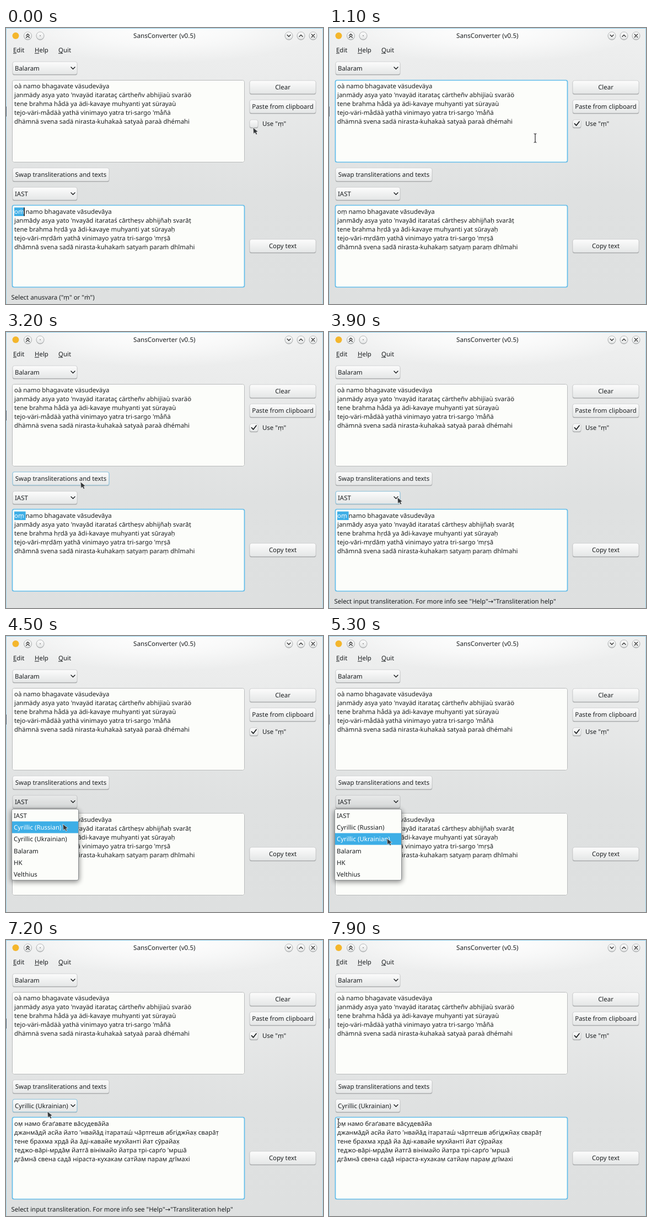
An HTML page that plays this animation: 575 px wide and 499 px high, repeating every 8000 ms.

```html
<!DOCTYPE html>
<html lang="en">
<head>
<meta charset="utf-8">
<title>SansConverter</title>
<style>
  html, body { margin: 0; width: 100%; height: 100%; overflow: hidden; background: #dfe1e1; }
  svg { display: block; width: 575px; height: 499px; }
  text {
    font: 11.43px "Noto Sans", "DejaVu Sans", sans-serif;
    fill: #1c1f21;
    text-rendering: geometricPrecision;
    white-space: pre;
  }
</style>
</head>
<body>
<svg id="stage" viewBox="0 0 575 499" xmlns="http://www.w3.org/2000/svg">
  <defs>
    <linearGradient id="window" x2="0" y2="1">
      <stop offset="0" stop-color="#eff0f0"/>
      <stop offset=".16" stop-color="#ebecec"/>
      <stop offset=".6" stop-color="#dfe1e1"/>
      <stop offset="1" stop-color="#dee0e0"/>
    </linearGradient>
    <radialGradient id="shine" gradientUnits="userSpaceOnUse" cx="0" cy="0" r="1"
      gradientTransform="translate(287 0) scale(280 64)">
      <stop offset="0" stop-color="#fff"/>
      <stop offset=".5" stop-color="#fff" stop-opacity=".6"/>
      <stop offset="1" stop-color="#fff" stop-opacity="0"/>
    </radialGradient>
    <linearGradient id="face" x2="0" y2="1">
      <stop offset="0" stop-color="#fcfcfc"/>
      <stop offset="1" stop-color="#e4e6e6"/>
    </linearGradient>
    <filter id="blur" x="-20%" y="-20%" width="140%" height="140%">
      <feGaussianBlur stdDeviation="5"/>
    </filter>
  </defs>
</svg>
<script>
const LOOP = 8000, STEP = 100;
const BLUE = '#3daee6', INK = '#1c1f21';
const stage = document.getElementById('stage');

function add(tag, attrs, parent = stage) {
  const el = document.createElementNS('http://www.w3.org/2000/svg', tag);
  for (const key in attrs) el.setAttribute(key, attrs[key]);
  parent.append(el);
  return el;
}
const group = (parent) => add('g', {}, parent);
const show = (el, on) => el.setAttribute('visibility', on ? 'visible' : 'hidden');

function rect(x, y, width, height, fill, attrs, parent) {
  return add('rect', { x, y, width, height, fill, ...attrs }, parent);
}
function label(x, y, str, attrs, parent) {
  const el = add('text', { x, y, ...attrs }, parent);
  el.textContent = str;
  return el;
}
function line(d, width = 1.5, stroke = INK, parent) {
  return add('path', { d, fill: 'none', stroke, 'stroke-width': width,
    'stroke-linecap': 'round', 'stroke-linejoin': 'round' }, parent);
}

// Raised panel; returns the hover outline
function raised(x, y, w, h) {
  rect(x - .5, y + .5, w + 1, h + 1, '#858889', { rx: 4, opacity: .3 });
  rect(x, y + 1, w, h, '#979a9b', { rx: 3.5 });
  rect(x, y, w, h, 'url(#face)', { rx: 3.5, stroke: '#c3c5c6', 'stroke-width': .7 });
  return rect(x, y, w, h, 'none', { rx: 3.5, stroke: '#93cbe6', 'stroke-width': 1.1 });
}
function button(x, y, w, h, str) {
  const glow = raised(x, y, w, h);
  label(x + w / 2, y + h / 2 + 4, str, { 'text-anchor': 'middle' });
  return { box: [x, y, w, h], glow };
}
function combo(y) {
  const glow = raised(12, y, 117, 23);
  const pressed = rect(12, y, 117, 23, '#70777b', { rx: 3.5, opacity: .14 });
  show(pressed, false);
  line(`M118 ${y + 9.7}l3.5 3.6l3.5 -3.6`, 1.4);
  return { box: [12, y, 118, 24], glow, pressed, text: label(16, y + 15.5, '') };
}
function field(y) {
  rect(11, y, 422, 149, '#fcfdfa', { rx: 3 });
  rect(11.5, y + .5, 421, 148, 'none', { rx: 3, stroke: '#b9bbbc' });
  const glow = rect(11.5, y + .5, 421, 148, 'none', { rx: 3, stroke: '#62bdea', 'stroke-width': 1.7 });
  return { box: [11, y, 422, 149], glow };
}
function lines(y, rows) {
  const g = group();
  rows.forEach((row, i) => label(15, y + i * 15.9, row, {}, g));
  return g;
}

// Window frame and title bar
rect(0, 0, 575, 499, 'url(#window)');
rect(0, 0, 575, 66, 'url(#shine)');
rect(0, 0, 575, 1, '#8ccbe8');
rect(0, 0, 1, 499, '#a4d6ec');
rect(574, 0, 1, 499, '#a4d6ec');
rect(0, 142, 1, 18, '#49667c');
add('circle', { cx: 17.5, cy: 14, r: 6, fill: '#f4b62c' });
const marks = [
  [39.5, 'M-2.8 -.5l2.8 -2.8l2.8 2.8M-2.8 3.3l2.8 -2.8l2.8 2.8'], [62, 'M0 0h.1'],
  [513, 'M-3 -1.5l3 3l3 -3'], [535, 'M-3 1.5l3 -3l3 3'], [557, 'M-2.7 -2.7l5.4 5.4M2.7 -2.7l-5.4 5.4'],
];
for (const [x, d] of marks) {
  add('circle', { cx: x, cy: 14.6, r: 7.2, fill: '#999c9d' });
  add('circle', { cx: x, cy: 14, r: 7, fill: 'url(#face)', stroke: '#a9abac', 'stroke-width': .8 });
  line(d, 1.3, '#333').setAttribute('transform', `translate(${x} 14)`);
}
label(287.3, 18, 'SansConverter (v0.5)', { 'text-anchor': 'middle', style: 'font-size:11.65px' });
for (const [x, str, w] of [[13, 'Edit', 6], [52, 'Help', 8], [95, 'Quit', 8]]) {
  label(x, 44, str);
  rect(x, 45.3, w, 1, INK);
}

// Controls
const inCombo = combo(61), outCombo = combo(288);
inCombo.text.textContent = 'Balaram';
const buttons = [
  inCombo, outCombo,
  button(12, 253, 175, 24, 'Swap transliterations and texts'),
  button(442, 95, 120, 24, 'Clear'),
  button(442, 130, 120, 24, 'Paste from clipboard'),
  button(442, 382, 120, 24, 'Copy text'),
];
const check = { box: [441, 163, 72, 20], glow: raised(442, 166, 15, 14) };
show(check.glow, false);
const tick = line('M445.5 173l3 3.2l5.5 -7', 1.8);
label(465, 177, 'Use "ṃ"');

const input = field(94), output = field(320);
lines(109, [
  'oà namo bhagavate väsudeväya',
  "janmädy asya yato 'nvayäd itarataç cärtheñv abhijïaù svaräö",
  'tene brahma hådä ya ädi-kavaye muhyanti yat sürayaù',
  "tejo-väri-mådäà yathä vinimayo yatra tri-sargo 'måñä",
  'dhämnä svena sadä nirasta-kuhakaà satyaà paraà dhémahi',
]);
const iast = [
  'oṁ namo bhagavate vāsudevāya',
  "janmādy asya yato 'nvayād itarataś cārtheṣv abhijñaḥ svarāṭ",
  'tene brahma hṛdā ya ādi-kavaye muhyanti yat sūrayaḥ',
  "tejo-vāri-mṛdāṁ yathā vinimayo yatra tri-sargo 'mṛṣā",
  'dhāmnā svena sadā nirasta-kuhakaṁ satyaṁ paraṁ dhīmahi',
];
const dotAbove = lines(336, iast);
const dotBelow = lines(336, iast.map((row) => row.replaceAll('ṁ', 'ṃ')));
const cyrillic = lines(336, [
  'ом̣ намо бгаґавате ва̄судева̄йа',
  "джанма̄дй асйа йато 'нвайа̄д ітараташ́ ча̄ртгешв абгіджн̃ах̣ свара̄т̣",
  'тене брахма хр̣да̄ йа а̄ді-кавайе мухйанті йат сӯрайах̣',
  "теджо-ва̄рі-мр̣да̄м̣ йатга̄ вінімайо йатра трі-сарґо 'мр̣ша̄",
  'дга̄мна̄ свена сада̄ ніраста-кухакам̣ сатйам̣ парам̣ дгі̄махі',
]);
const selBox = rect(15, 324.5, 0, 15.5, BLUE);
const selText = label(15, 336, '', { style: 'fill:#fff' });
const caret = rect(32.3, 324.5, 1.6, 15.5, '#111');
const status = label(9.5, 490.5, '');

// Drop-down list
const popup = group();
rect(9, 315, 124, 130, '#000', { rx: 5, opacity: .45, filter: 'url(#blur)' }, popup);
rect(10.5, 313, 121, 128.5, '#fcfdfa', { rx: 2.5, stroke: '#8b8f91' }, popup);
const bar = rect(11, 0, 120, 21.2, BLUE, {}, popup);
const items = ['IAST', 'Cyrillic (Russian)', 'Cyrillic (Ukrainian)', 'Balaram', 'HK', 'Velthius']
  .map((str, i) => label(14, 329 + i * 21.2, str, {}, popup));

const arrow = add('path', { d: 'M0 0L1 11.5L3.6 9L5.6 13L7.8 12L5.9 8.2L9.3 7.4Z',
  fill: '#35383a', stroke: '#f4f4f4', 'stroke-width': .7 });
const beam = group();
const beamShape = 'M-2 -8Q0 -8 0 -6.5Q0 -8 2 -8M0 -6.5V6.5M-2 8Q0 8 0 6.5Q0 8 2 8';
line(beamShape, 2.4, '#fff', beam);
line(beamShape, 1.2, '#222', beam);

// Pointer path: time, x, y
const path = [
  [0, 448, 180], [800, 448, 180], [1000, 436, 186], [1300, 250, 225], [1500, 100, 290],
  [1700, 15, 332], [1800, 15, 332], [2100, 21, 332], [2200, 21, 332], [2300, 33, 332],
  [2500, 38, 332], [2600, 38, 332], [2900, 60, 300], [3100, 100, 268], [3300, 170, 274],
  [3500, 214, 290], [3700, 165, 303], [3900, 124, 299], [4100, 124, 299], [4500, 103, 340],
  [4700, 138, 396], [4900, 105, 366], [5300, 105, 366], [5800, 240, 278], [5900, 240, 278],
  [6200, 300, 225], [6500, 430, 180], [6700, 459, 172], [6800, 459, 172], [6900, 471, 175],
  [7000, 330, 215], [7200, 75, 310], [7400, 4, 326], [7500, 8, 332], [7700, 26, 332],
  [7800, 26, 332], [7900, 17, 331], [8000, 17, 331],
];
function pointer(t) {
  const i = path.findIndex((p) => p[0] > t);
  const [t0, x0, y0] = path[i - 1], [t1, x1, y1] = path[i];
  const k = (t - t0) / (t1 - t0);
  return [x0 + (x1 - x0) * k, y0 + (y1 - y0) * k];
}
const inside = ([x, y, w, h], [px, py]) => px >= x && px <= x + w && py >= y && py <= y + h;

// Value of the last step that has begun
const at = (steps, t) => steps.filter((s) => s[0] <= t).pop()[1];
const selection = [[0, 'oṁ'], [200, ''], [2100, 'o'], [2300, 'oṃ'], [2500, 'oṃ '], [4200, '']];
const selWidth = { '': 0, 'o': 7, 'oṁ': 17.6, 'oṃ': 17.6, 'oṃ ': 20.6 };

function statusText(t, pos, open) {
  if (open) return '';
  if (t >= 5400 && t < 6200) return 'Welcome to SansConverter';
  if (inside(check.box, pos)) return 'Select anusvara ("ṃ" or "ṁ")';
  if (inside(outCombo.box, pos))
    return 'Select input transliteration. For more info see "Help"→"Transliteration help"';
  return '';
}

function draw(t) {
  const pos = pointer(t);
  const open = t >= 4200 && t < 5400;
  const converted = t >= 5400;

  for (const b of buttons) show(b.glow, !open && inside(b.box, pos));
  if (converted && t < 6000) show(outCombo.glow, true);
  show(outCombo.pressed, open);
  show(input.glow, !open && inside(input.box, pos));
  show(output.glow, !open);
  show(tick, t >= 200);

  show(dotAbove, t < 200);
  show(dotBelow, t >= 200 && !converted);
  show(cyrillic, converted);
  outCombo.text.textContent = converted ? 'Cyrillic (Ukrainian)' : 'IAST';

  const sel = at(selection, t);
  selBox.setAttribute('width', selWidth[sel]);
  selText.textContent = sel;
  show(caret, t < 200);
  status.textContent = statusText(t, pos, open);

  show(popup, open);
  const row = Math.max(0, Math.min(5, Math.floor((pos[1] - 314) / 21.2)));
  bar.setAttribute('y', 314 + row * 21.2);
  items.forEach((el, i) => { el.style.fill = i === row ? '#fff' : INK; });

  const typing = !open && (inside(input.box, pos) || inside(output.box, pos));
  show(arrow, !typing);
  show(beam, typing);
  for (const el of [arrow, beam]) el.setAttribute('transform', `translate(${pos})`);
}

const start = performance.now();
function loop() {
  const t = (performance.now() - start) % LOOP;
  draw(Math.floor(t / STEP) * STEP);
  requestAnimationFrame(loop);
}
loop();
</script>
</body>
</html>
```
